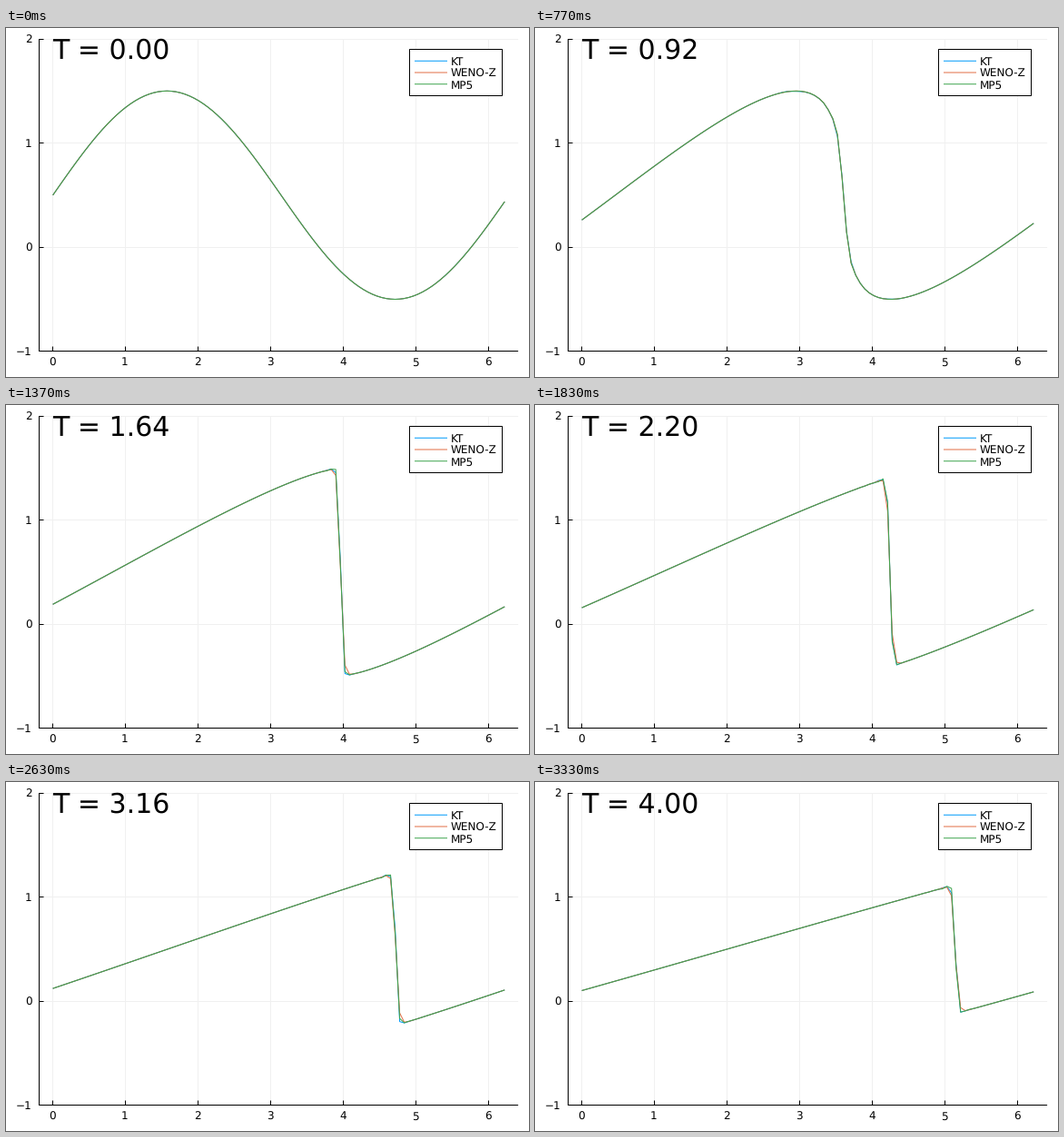
A matplotlib script that plays this animation: 576x384 px, repeating every 3.36 s.

```python
import numpy as np
import matplotlib.pyplot as plt
from matplotlib.animation import FuncAnimation
from matplotlib.patches import Rectangle

W, H, DPI = 576, 384, 100
PX = 72 / DPI                      # one pixel in points
N, STATES, DT_STATE, SUBSTEPS = 100, 101, 0.04, 4
DX = 2 * np.pi / N
X = DX * np.arange(N)

LEFT, RIGHT, TOP, BOTTOM = 36.7, 564.1, 12.0, 355.8
PAD = 0.03 * X[-1]


# --- Burgers' equation, three schemes on a periodic grid ---

def minmod(*args):
    a = np.array(args)
    lo, hi = a.min(axis=0), a.max(axis=0)
    return np.where(lo > 0, lo, np.where(hi < 0, hi, 0.0))


def flux(u):
    return 0.5 * u * u


def kt_flux(u):
    back, ahead = u - np.roll(u, 1), np.roll(u, -1) - u
    slope = minmod(2 * back, (back + ahead) / 2, 2 * ahead)
    ul = u + slope / 2
    ur = np.roll(u - slope / 2, -1)
    speed = np.maximum(abs(ul), abs(ur))
    return (flux(ul) + flux(ur) - speed * (ur - ul)) / 2


def weno_z(a, b, c, d, e):
    b0 = 13 / 12 * (a - 2 * b + c) ** 2 + (a - 4 * b + 3 * c) ** 2 / 4
    b1 = 13 / 12 * (b - 2 * c + d) ** 2 + (b - d) ** 2 / 4
    b2 = 13 / 12 * (c - 2 * d + e) ** 2 + (3 * c - 4 * d + e) ** 2 / 4
    tau = abs(b0 - b2)
    w0, w1, w2 = (g * (1 + (tau / (s + 1e-20)) ** 2)
                  for g, s in ((0.1, b0), (0.6, b1), (0.3, b2)))
    q0 = (2 * a - 7 * b + 11 * c) / 6
    q1 = (-b + 5 * c + 2 * d) / 6
    q2 = (2 * c + 5 * d - e) / 6
    return (w0 * q0 + w1 * q1 + w2 * q2) / (w0 + w1 + w2)


def mp5(a, b, c, d, e):
    v = (2 * a - 13 * b + 47 * c + 27 * d - 3 * e) / 60
    v_mp = c + minmod(d - c, 4 * (c - b))
    dm, d0, dp = a - 2 * b + c, b - 2 * c + d, c - 2 * d + e
    curve_r = minmod(4 * d0 - dp, 4 * dp - d0, d0, dp)
    curve_l = minmod(4 * d0 - dm, 4 * dm - d0, d0, dm)
    upper = c + 4 * (c - b)
    median = (c + d - curve_r) / 2
    large = c + (c - b) / 2 + 4 / 3 * curve_l
    near, far = np.array([c, d, median]), np.array([c, upper, large])
    lo = np.maximum(near.min(axis=0), far.min(axis=0))
    hi = np.minimum(near.max(axis=0), far.max(axis=0))
    limited = v + minmod(lo - v, hi - v)
    return np.where((v - c) * (v - v_mp) > 1e-10, limited, v)


def split_flux(reconstruct):
    """Global Lax-Friedrichs splitting around a left-biased reconstruction."""
    def face_flux(u):
        speed = abs(u).max()
        plus = (flux(u) + speed * u) / 2
        minus = (flux(u) - speed * u) / 2
        return (reconstruct(*(np.roll(plus, s) for s in (2, 1, 0, -1, -2)))
                + reconstruct(*(np.roll(minus, s) for s in (-3, -2, -1, 0, 1))))
    return face_flux


def solve(face_flux):
    def rate(u):
        f = face_flux(u)
        return (np.roll(f, 1) - f) / DX

    dt = DT_STATE / SUBSTEPS
    u = 0.5 + np.sin(X)
    history = [u]
    for _ in range(STATES - 1):
        for _ in range(SUBSTEPS):
            u1 = u + dt * rate(u)
            u2 = 0.75 * u + 0.25 * (u1 + dt * rate(u1))
            u = u / 3 + 2 / 3 * (u2 + dt * rate(u2))
        history.append(u)
    return history


SCHEMES = [
    ("KT", "#009afa", solve(kt_flux)),
    ("WENO-Z", "#e26f46", solve(split_flux(weno_z))),
    ("MP5", "#3da44d", solve(split_flux(mp5))),
]


# --- Stage, in pixel coordinates with y downwards ---

plt.rcParams.update({"font.family": "DejaVu Sans", "text.hinting": "none"})
fig = plt.figure(figsize=(W / DPI, H / DPI), dpi=DPI, facecolor="white")
ax = fig.add_axes([0, 0, 1, 1])
ax.set_xlim(0, W)
ax.set_ylim(H, 0)
ax.axis("off")


def sx(x):
    return LEFT + (x + PAD) / (X[-1] + 2 * PAD) * (RIGHT - LEFT)


def sy(y):
    return BOTTOM - (y + 1) / 3 * (BOTTOM - TOP)


def mid(v):
    """Centre of the pixel that holds v, for crisp straight lines."""
    return np.floor(v) + 0.5


def line(xs, ys, color="black", **kw):
    return ax.plot(xs, ys, color=color, lw=PX, snap=False,
                   solid_capstyle="butt", **kw)[0]


def label(x, y, s, size=12, **kw):
    return ax.text(x, y, s, fontsize=size * PX, va="baseline", **kw)


x_ticks, y_ticks = range(7), range(-1, 3)
axis_x, axis_y = mid(LEFT), mid(BOTTOM)
for t in x_ticks:
    line([mid(sx(t))] * 2, [TOP, axis_y], "#f0f0f0")
for t in y_ticks:
    line([axis_x, RIGHT], [mid(sy(t))] * 2, "#f0f0f0")

line([axis_x] * 2, [TOP, axis_y + 0.5])
line([axis_x - 0.5, RIGHT], [axis_y] * 2)
for t in x_ticks:
    line([mid(sx(t))] * 2, [axis_y - 5, axis_y])
    label(sx(t) - 0.8, 371.4, str(t), ha="center")
for t in y_ticks:
    line([axis_x, axis_x + 5], [mid(sy(t))] * 2)
    label(28.7, sy(t) + 4.2, str(t).replace("-", "\u2212"), ha="right")

curves = [line(sx(X), sy(hist[0]), color, solid_joinstyle="round")
          for _, color, hist in SCHEMES]

BOX_X, BOX_Y, BOX_W, BOX_H = 444.5, 23.5, 102, 51
ax.add_patch(Rectangle((BOX_X, BOX_Y), BOX_W, BOX_H, fc="white", ec="black",
                       lw=PX, snap=False, zorder=3))
for row, (name, color, _) in enumerate(SCHEMES, 1):
    y = BOX_Y + row * BOX_H / 4
    line([450, 486], [y, y], color, zorder=4)
    label(489.5, y + 4.6, name, zorder=4)

clock = label(50.6, 33.3, "T = 0.00", 30)


# --- Animation: 30 states per second, shown on a 20 ms clock ---

STEP, LOOP = 20, 3360
starts = 10 * np.round(np.arange(STATES) * 10 / 3)


def draw(frame):
    k = np.searchsorted(starts, (frame + 0.5) * STEP, side="right") - 1
    for curve, (_, _, hist) in zip(curves, SCHEMES):
        curve.set_ydata(sy(hist[k]))
    clock.set_text(f"T = {k * DT_STATE:.2f}")
    return [*curves, clock]


anim = FuncAnimation(fig, draw, frames=LOOP // STEP, interval=STEP,
                     init_func=lambda: draw(0), repeat=True, repeat_delay=0)
plt.show()
```
